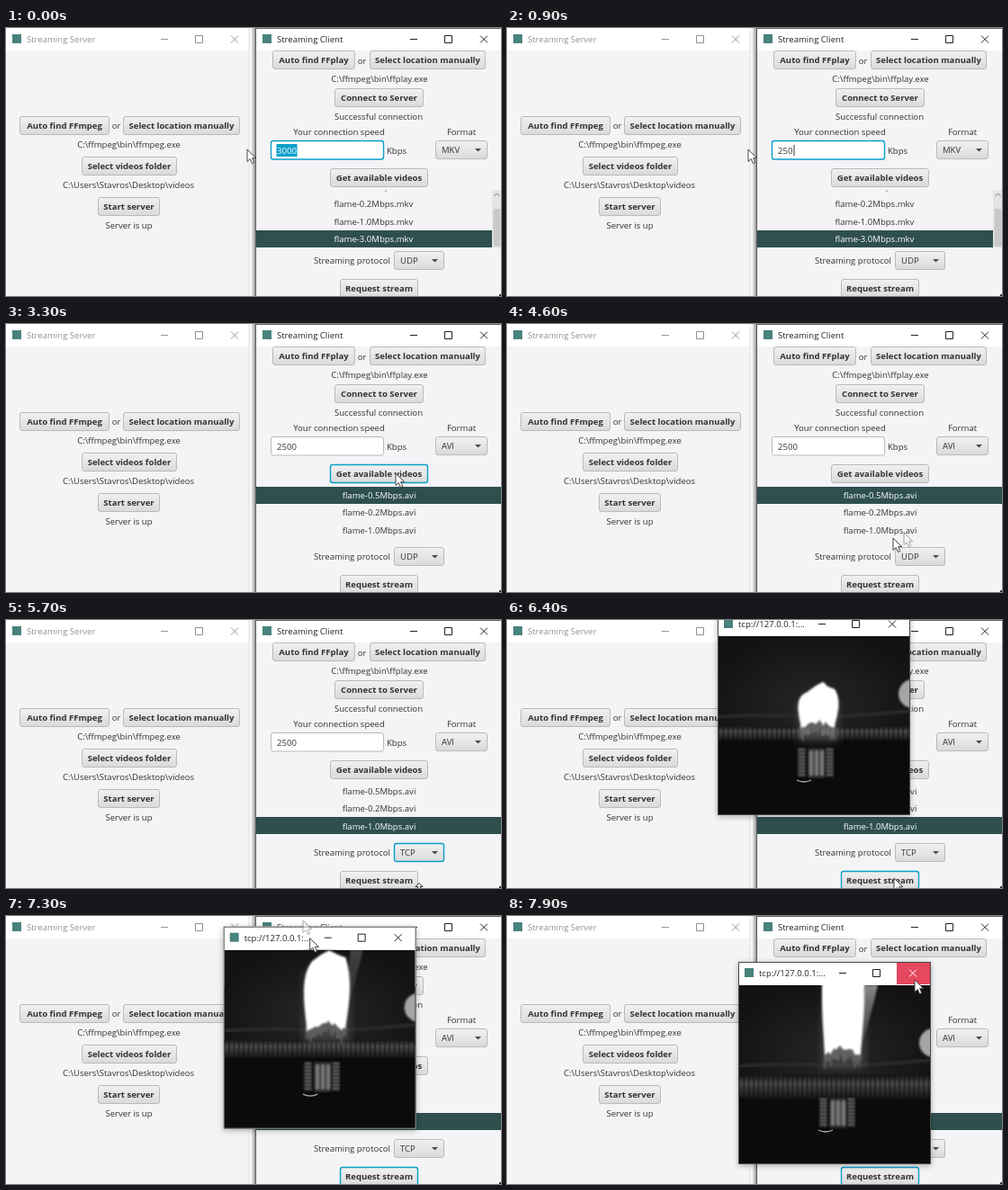
Recreate the animation shown at these times as an HTML page. Size 550x298 px, loop 8000 ms.

```html
<!DOCTYPE html>
<html lang="en">
<head>
<meta charset="utf-8">
<title>Streaming demo</title>
<style>
  html, body { margin: 0; width: 100%; height: 100%; overflow: hidden; background: #f4f3f5; }
  svg { display: block; width: 550px; height: 298px; }
  text { font: 9.55px "Open Sans", "Noto Sans", sans-serif; fill: #333; white-space: pre; }
  .bold { font-weight: 700; }
</style>
</head>
<body>
<svg viewBox="0 0 550 298" xmlns="http://www.w3.org/2000/svg">
  <defs>
    <linearGradient id="face" x2="0" y2="1">
      <stop offset="0" stop-color="#f1f1f1"/><stop offset="1" stop-color="#dadada"/>
    </linearGradient>
    <linearGradient id="tube" x2="0" y2="1">
      <stop offset="0" stop-color="#151515"/><stop offset=".35" stop-color="#464646"/><stop offset="1" stop-color="#141414"/>
    </linearGradient>
    <radialGradient id="room">
      <stop offset="0" stop-color="#262626"/><stop offset="1" stop-color="#131313"/>
    </radialGradient>
    <linearGradient id="streak" x2="0" y2="1">
      <stop offset="0" stop-color="#8a8a8a"/><stop offset="1" stop-color="#777" stop-opacity=".1"/>
    </linearGradient>
    <pattern id="ribs" width="5.4" height="30" patternUnits="userSpaceOnUse">
      <path d="M1 0V30" stroke="#0d0d0d" stroke-width="1.6" opacity=".5"/>
    </pattern>
    <clipPath id="list"><rect x="278" y="180.5" width="272" height="64"/></clipPath>
    <clipPath id="screen"><rect x="1" y="26" width="212" height="198"/></clipPath>
    <filter id="soft"><feGaussianBlur stdDeviation="1"/></filter>
    <filter id="softer"><feGaussianBlur stdDeviation="5"/></filter>
    <filter id="shadow" x="-20%" y="-20%" width="140%" height="140%">
      <feDropShadow dx="0" dy="1.5" stdDeviation="3" flood-opacity=".32"/>
    </filter>
  </defs>
  <g id="stage"></g>
</svg>
<script>
const LOOP = 8000, STEP = 100;
const INK = '#333', BLUE = '#0b9fc9', SLATE = '#2f4f4f';
const stage = document.getElementById('stage');

// Keyed rows: [time, ...values]
const POINTER = [
  [0, 268, 135], [900, 268, 135], [1100, 300, 150], [1700, 514, 140], [2200, 514, 140],
  [2400, 500, 157], [2600, 500, 157], [3000, 433, 166], [3500, 433, 166], [3800, 425, 190],
  [4100, 425, 190], [4500, 441, 232], [4600, 429, 238], [4800, 425, 230], [4900, 425, 230],
  [5100, 472, 259], [5200, 472, 259], [5400, 455, 280], [5500, 455, 280], [5700, 459, 297],
  [5800, 459, 297], [6000, 430, 287], [6400, 430, 287], [6800, 435, 38], [6900, 421, 38],
  [7100, 330, 5], [7200, 330, 5], [7500, 353, 64], [7600, 353, 64], [7800, 453, 71]
];
const PLAYER = [[7200, 234, -8], [7500, 257, 51]];
// left, right, top, bottom of the flame
const FLAME = [[6300, 90, 134, 82, 126], [6900, 87, 140, 68, 117], [7400, 90, 141, 20, 108], [7900, 93, 141, -40, 99]];
// band height, coil left, coil top
const SCENE = [[6900, 16, 89, 150], [7900, 26, 90, 151]];
const TYPED = [[1000, '2500'], [800, '250'], [600, '25'], [400, '2'], [0, '3000']];
const FOCUS = [[5900, 'request'], [5100, 'protocol'], [3900, 'list'], [3000, 'get'], [1700, 'format'], [0, 'speed']];

const latest = (rows, t) => rows.find(r => t >= r[0])[1];

function at(rows, t) {
  const i = rows.findIndex(r => r[0] > t);
  if (i === 0) return rows[0].slice(1);
  if (i < 0) return rows[rows.length - 1].slice(1);
  const a = rows[i - 1], b = rows[i], k = (t - a[0]) / (b[0] - a[0]);
  return a.slice(1).map((v, n) => v + (b[n + 1] - v) * k);
}

function random(seed) {
  return () => (seed = (seed * 16807) % 2147483647) / 2147483647;
}

const rect = (x, y, w, h, fill, more = '') =>
  `<rect x="${x}" y="${y}" width="${w}" height="${h}" fill="${fill}" ${more}/>`;
const path = (d, more) => `<path d="${d}" ${more}/>`;
const text = (s, x, y, anchor = 'middle', fill = INK, cls = '') =>
  `<text x="${x}" y="${y + 3.5}" text-anchor="${anchor}" style="fill:${fill}" class="${cls}">${s}</text>`;

const box = (x1, y1, x2, y2, focus, fill = 'url(#face)') =>
  rect(x1 + .5, y1 + .5, x2 - x1 - 1, y2 - y1 - 1, fill,
    `rx="2.5" stroke="${focus ? BLUE : '#bababa'}" stroke-width="${focus ? 1.4 : 1}"`);

const button = (s, x1, y1, x2, focus) =>
  box(x1, y1, x2, y1 + 21, focus) + text(s, (x1 + x2) / 2, y1 + 10.5, 'middle', INK, 'bold');

const combo = (s, x1, y1, x2, focus) =>
  box(x1, y1, x2, y1 + 21, focus) + text(s, x1 + 7, y1 + 10.5, 'start') +
  path(`M${x2 - 14} ${y1 + 9}h7l-3.5 3.5z`, 'fill="#4a4a4a"');

function popup(items, x, y, w, active) {
  return rect(x + .5, y + .5, w - 1, items.length * 19.5 + 2, '#fff', 'stroke="#b9b9b9" filter="url(#shadow)"') +
    items.map((s, i) => {
      const top = y + 1.5 + i * 19.5, on = i === active;
      return (on ? rect(x + 1, top, w - 2, 19, BLUE) : '') + text(s, x + 5, top + 9.5, 'start', on ? '#fff' : INK);
    }).join('');
}

function titleBar(s, x, w, controls, color) {
  const [a, b, c] = controls;
  return rect(x, 0, w, 25, '#fff') + rect(x + 7, 7, 10, 10, '#48827c') +
    text(s, x + 23, 12.5, 'start', color) +
    path(`M${a - 4} 12.5h8M${b - 4.5} 8.5h8v8h-8z`, `fill="none" stroke="${color}"`) +
    path(`M${c - 4} 8.5l8 8m0 -8l-8 8`, `stroke="${color}"`);
}

const server = rect(0, 0, 270, 298, '#f4f3f5') +
  titleBar('Streaming Server', 0, 270, [176, 215, 254], '#929292') +
  button('Auto find FFmpeg', 15, 98, 115) + text('or', 122.5, 108.5) +
  button('Select location manually', 130, 98, 260) +
  text('C:\\ffmpeg\\bin\\ffmpeg.exe', 136.5, 129) +
  button('Select videos folder', 84, 143, 190) +
  text('C:\\Users\\Stavros\\Desktop\\videos', 136, 174) +
  button('Start server', 102, 188, 171) + text('Server is up', 136.5, 219) +
  rect(270, 0, 7, 298, '#f7f7f7') + rect(269.5, 0, 1, 298, '#e2e2e2') +
  rect(273, 0, 2, 298, '#d6d6d6') + rect(275, 0, 2, 298, '#aaa');

function list(t) {
  const avi = t >= 3000, ext = avi ? 'avi' : 'mkv';
  const speeds = avi ? ['0.5', '0.2', '1.0'] : ['0.5', '0.2', '1.0', '3.0'];
  const chosen = !avi ? 3 : t < 4800 ? 0 : 2;
  const first = avi ? 190.3 : 176.5;
  const rows = speeds.map((s, i) => {
    const y = first + i * 19.4, on = i === chosen;
    return (on ? rect(278, Math.round(y - 9.7), 272, 19, SLATE) : '') +
      text(`flame-${s}Mbps.${ext}`, avi ? 414.5 : 408.5, y, 'middle', on ? '#fff' : INK);
  }).join('');
  const bar = avi ? '' : rect(540, 180, 10, 65, '#e4e4e4') + rect(541.5, 201, 8, 42, '#c9c9c9', 'rx="2"') +
    path('M542.5 187l3-3 3 3', 'fill="none" stroke="#777"');
  return `<g clip-path="url(#list)">${rows}${bar}</g>`;
}

function client(t) {
  const focus = latest(FOCUS, t), typed = latest(TYPED, t);
  const selected = t < 400, caret = 302 + typed.length * 5.5;
  return rect(277, 0, 273, 298, '#f4f3f5') +
    titleBar('Streaming Client', 278, 272, [453, 492, 531], '#222') +
    button('Auto find FFplay', 296, 25, 388) + text('or', 395.5, 36) +
    button('Select location manually', 404, 25, 533) +
    text('C:\\ffmpeg\\bin\\ffplay.exe', 415, 56.5) +
    button('Connect to Server', 365, 67, 464) + text('Successful connection', 414, 98) +
    text('Your connection speed', 370, 115) + text('Format', 506, 115) +
    box(294, 125, 420, 146.5, focus === 'speed', '#fff') +
    (selected ? rect(300.5, 129, 23, 14, BLUE) : '') +
    text(typed, 301, 136, 'start', selected ? '#fff' : INK) +
    (focus === 'speed' && !selected ? rect(caret, 130, 1, 12, INK) : '') +
    text('Kbps', 423, 136, 'start') +
    combo(t < 2500 ? 'MKV' : 'AVI', 477, 125, 535, focus === 'format') +
    button('Get available videos', 360, 156, 469, focus === 'get') +
    list(t) +
    text('Streaming protocol', 384.5, 258.5) +
    combo(t < 5500 ? 'UDP' : 'TCP', 431, 248, 487, focus === 'protocol') +
    button('Request stream', 371, 279, 458, focus === 'request') +
    rect(277, 0, 1, 298, '#555') + rect(277, 0, 273, 1, '#666') + rect(548, 296, 2, 2, '#333') +
    (t >= 1800 && t < 2500 ? popup(['AVI', 'MP4', 'MKV'], 478, 146, 57, t < 2300 ? 2 : 0) : '') +
    (t >= 5200 && t < 5500 ? popup(['TCP', 'UDP'], 431, 269, 56, t < 5300 ? 1 : 0) : '');
}

function flame(t) {
  const [l, r, top, bottom] = at(FLAME, t), rnd = random(t + 7);
  const h = bottom - top, n = 18, footL = l + 3, footR = r - 5;
  let edge = '', fray = '';
  for (let i = 0; i <= n; i++) {
    const x = footR - (footR - footL) * i / n;
    const y = bottom + 3 - Math.sin(Math.PI * i / n) * 9 + rnd() * 6;
    edge += `L${x} ${y}`;
    fray += `M${x} ${bottom - 10}V${y + 7 + rnd() * 9}`;
  }
  return rect(l, Math.max(top, 30) + 20, r - l, bottom - Math.max(top, 30), '#777', 'opacity=".35" filter="url(#softer)"') +
    path(fray, 'stroke="#8a8a8a" stroke-width="1.6" opacity=".6" filter="url(#soft)"') +
    path(`M${footL} ${bottom}C${l - 1} ${bottom - h * .35} ${l - 3} ${top + h * .3} ${l + 9} ${top + 9}` +
      `L${l + 20} ${top + 1}L${l + 28} ${top - 3}L${r - 13} ${top + 2}L${r - 5} ${top + 5}` +
      `C${r + 2} ${top + h * .35} ${r} ${bottom - h * .35} ${footR} ${bottom}${edge}z`,
      'fill="#fff" filter="url(#soft)"');
}

function coil(x, y) {
  const side = dx => rect(x + dx, y, 9, 33, '#1a1a1a') +
    path(`M${x + dx + 4.5} ${y + 1}V${y + 33}`, 'stroke="#606060" stroke-width="8" stroke-dasharray="2 2"');
  const bars = [13, 19, 25].map(dx => rect(x + dx, y + 3, 4, 28, '#777', 'rx="1.5"')).join('');
  return `<g filter="url(#soft)">${side(0)}${side(31)}${rect(x + 11, y, 19, 34, '#2a2a2a')}${bars}</g>` +
    path(`M${x - 1} ${y + 36}q8 4 16 0`, 'fill="none" stroke="#b0b0b0" stroke-width="1.3"');
}

function footage(t) {
  const [band, cx, cy] = at(SCENE, t), k = Math.min(1, Math.max(0, (t - 6900) / 1000));
  return rect(1, 26, 212, 198, '#131313') +
    `<ellipse cx="107" cy="100" rx="118" ry="75" fill="url(#room)"/>` +
    path('M0 116Q60 112 90 115T214 109', 'fill="none" stroke="#2c2c2c" stroke-width="4" filter="url(#soft)"') +
    rect(0, 126, 214, band, 'url(#tube)') + rect(0, 126, 214, band, 'url(#ribs)') +
    rect(0, 126 + band, 214, 100, '#0b0b0b') +
    coil(cx, cy) +
    path('M141 26h14Q145 70 133 106L129 104Q138 60 141 26z', `fill="url(#streak)" opacity="${k}" filter="url(#soft)"`) +
    flame(t) +
    '<circle cx="217" cy="90" r="16" fill="#a5a5a5" filter="url(#soft)"/>';
}

function player(t) {
  if (t < 6300) return '';
  const [x, y] = at(PLAYER, t), hot = t >= 7800;
  return `<g transform="translate(${x} ${y})">` +
    rect(0, 0, 214, 225, '#fff', 'filter="url(#shadow)"') +
    titleBar('tcp://127.0.0.1:...', 0, 214, [116, 154, 194], '#222') +
    (hot ? rect(176, 0, 38, 25, '#e5485f') + path('M190 8.5l8 8m0 -8l-8 8', 'stroke="#fff"') : '') +
    `<g clip-path="url(#screen)">${footage(t)}</g>` +
    rect(.5, .5, 213, 224, 'none', 'stroke="#4a4a4a"') + '</g>';
}

const arrow = (x, y, opacity) =>
  path(`M${x} ${y}v13.5l3.2 -2.9 2.3 5 2.3 -1 -2.2 -4.9h4.2z`,
    `fill="#fff" stroke="#333" stroke-width=".9" opacity="${opacity}"`);

function pointer(t) {
  const [x, y] = at(POINTER, t);
  if (t >= 5700 && t <= 5800)
    return path(`M${x} ${y - 4.5}l4 4h-2.6v6h2.6l-4 4 -4 -4h2.6v-6h-2.6z`, 'fill="#fff" stroke="#222"');
  const [px, py] = at(POINTER, Math.max(0, t - STEP));
  const moved = Math.hypot(x - px, y - py) > 4;
  return (moved ? arrow(px, py, .45) : '') + arrow(x, y, t >= 6700 && t < 7000 ? .55 : 1);
}

let shown = -1;
function tick(now) {
  const t = Math.floor(now % LOOP / STEP) * STEP;
  if (t !== shown) {
    shown = t;
    stage.innerHTML = server + client(t) + player(t) + pointer(t);
  }
  requestAnimationFrame(tick);
}
tick(0);
</script>
</body>
</html>
```
